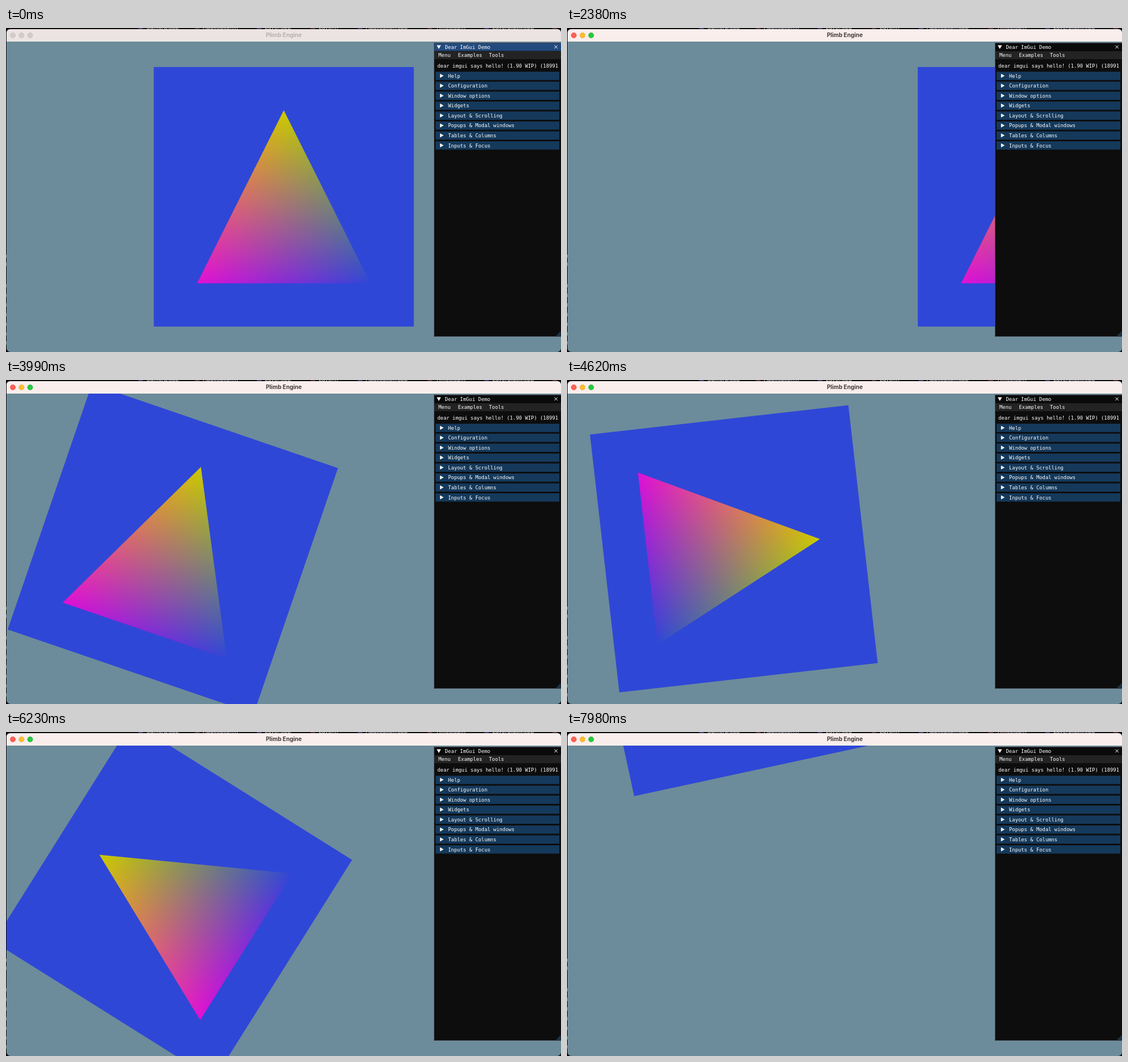
An HTML page with a canvas for the animation above (8 s loop, 978 by 572 pixels).

```html
<!DOCTYPE html>
<html lang="en">
<meta charset="utf-8">
<title>Plimb Engine</title>
<style>
  html, body { margin: 0; width: 978px; height: 572px; overflow: hidden; background: #0c0b0d; }
  canvas, svg { position: absolute; left: 0; top: 0; }
  canvas { clip-path: inset(2px 0 0 1px round 7px); }
  text { white-space: pre; }
  .tab { font: 10px Inter, sans-serif; fill: #b9b7ba; }
  .title { font: 700 10px Inter, sans-serif; fill: #403a3a; text-anchor: middle; }
  .gui { font: 8.86px "DejaVu Sans Mono", monospace; fill: #fff; }
  .bar { fill: #faeeec; }
  .guiTitle { fill: #0a0a0a; }
  .idle .bar { fill: #ebe4e2; }
  .idle .title { fill: #b5afae; }
  .idle .lights circle { fill: #d2cbc9; stroke: #c3bcba; }
  .idle .guiTitle { fill: #234a7d; }
</style>
<canvas id="scene" width="978" height="572"></canvas>
<svg id="ui" width="978" height="572">
  <g id="backdrop"></g>
  <path class="bar" d="M1 24V9q0-7 7-7H971q7 0 7 7V24z"/>
  <g class="lights" stroke-width=".5">
    <circle cx="12" cy="13" r="4.7" fill="#fe5f57" stroke="#e0443e"/>
    <circle cx="27.3" cy="13" r="4.7" fill="#febc2e" stroke="#dea123"/>
    <circle cx="42.5" cy="13" r="4.7" fill="#28c840" stroke="#1aab29"/>
  </g>
  <text class="title" x="489.5" y="16.4">Plimb Engine</text>

  <rect x="754.5" y="26.5" width="224" height="518" fill="#0d0d0d" stroke="#3c3f48"/>
  <rect class="guiTitle" x="755" y="27" width="223" height="13.5"/>
  <rect x="755" y="41" width="223" height="14" fill="#232323"/>
  <path d="M759 30.5h7.4l-3.7 6.4z" fill="#fff"/>
  <path d="M966.3 30.6l5.6 5.6m0-5.6l-5.6 5.6" stroke="#fff"/>
  <path d="M977.5 535v9.5h-9.5z" fill="#1d3342"/>
  <g class="gui" id="gui"></g>
</svg>
<script>
const ui = document.getElementById('ui');
const ctx = document.getElementById('scene').getContext('2d');
const label = (x, y, text) => `<text x="${x}" y="${y}">${text}</text>`;

// Slivers of the editor behind the window
const tabs = [[247, 'Camera.cpp'], [347, 'Application.h'], [456, 'Layer.cpp'], [551, 'Layer.h'],
  [634, 'Application.cpp'], [757, 'Timestep.h'], [857, 'LayerStack.cpp'], [977, '']];
const codeRows = [403, 417, 455, 472, 489, 506, 523, 540, 556];
document.getElementById('backdrop').innerHTML =
  tabs.map(([x, name]) => `<rect x="${x - 14}" width="8" height="1.5" fill="${
    name.endsWith('cpp') ? '#5b4390' : '#6b3a3a'}"/><text class="tab" x="${x}" y="2">${name}</text>`).join('') +
  codeRows.map(y => `<rect y="${y - 3}" width="1" height="6" fill="#77757a"/>`).join('');

const sections = ['Help', 'Configuration', 'Window options', 'Widgets', 'Layout &amp; Scrolling',
  'Popups &amp; Modal windows', 'Tables &amp; Columns', 'Inputs &amp; Focus'];
document.getElementById('gui').innerHTML =
  label(773.5, 36.6, 'Dear ImGui Demo') + label(762, 51.2, 'Menu') + label(796.5, 51.2, 'Examples') +
  label(851, 51.2, 'Tools') + label(760, 69.6, 'dear imgui says hello! (1.90 WIP) (18991') +
  sections.map((name, i) => {
    const y = 84.5 + 17.55 * i;
    return `<rect x="757" y="${y - 7.3}" width="218" height="14.6" fill="#15395b"/>
      <path d="M764.8 ${y - 3.8}v7.2l6.4-3.6z"/>` + label(779, y + 3.2, name);
  }).join('');

const HALF = 152.75;           // half a world unit in pixels
const MOVE = HALF * 10 / 1000; // 5 units per second
const TURN = 0.18;             // 180 degrees per second

// Corner, foot of its height on the opposite edge, colour
const corners = [
  [0, -1, 0, 1, '204,202,0'],
  [-1, 1, 0.6, 0.2, '224,16,212'],
  [1, 1, -0.6, 0.2, '47,71,214'],
];

function drawTriangle() {
  ctx.beginPath();
  for (const [x, y] of corners) ctx.lineTo(x * HALF, y * HALF);
  ctx.closePath();
  ctx.fillStyle = '#000';
  ctx.fill();
  ctx.globalCompositeOperation = 'lighter';
  for (const [x, y, footX, footY, rgb] of corners) {
    const shade = ctx.createLinearGradient(x * HALF, y * HALF, footX * HALF, footY * HALF);
    shade.addColorStop(0, `rgb(${rgb})`);
    shade.addColorStop(1, '#000');
    ctx.fillStyle = shade;
    ctx.fill();
  }
  ctx.globalCompositeOperation = 'source-over';
}

function render(t) {
  // Time a key has been held down so far
  const held = (from, to) => Math.min(Math.max(t, from), to) - from;
  const x = 489.5 + MOVE * (held(1711.4, 1845.6) + held(2200, 2300) - held(2636.7, 2998.9));
  const y = 298 - MOVE * held(7220, 7519.2);
  const angle = TURN * (held(3885, 4435) - held(4534, 4945) - held(5769.4, 6976.1));

  ui.classList.toggle('idle', t < 770);
  ctx.resetTransform();
  ctx.fillStyle = '#6c8c9b';
  ctx.fillRect(0, 0, 978, 572);
  ctx.translate(x, y);
  ctx.rotate(angle * Math.PI / 180);
  ctx.fillStyle = '#2f47d6';
  ctx.fillRect(-1.5 * HALF, -1.5 * HALF, 3 * HALF, 3 * HALF);
  drawTriangle();
}

function tick() {
  render(Math.floor(performance.now() % 8000 / 70) * 70);
  requestAnimationFrame(tick);
}
tick();
</script>
</html>
```
